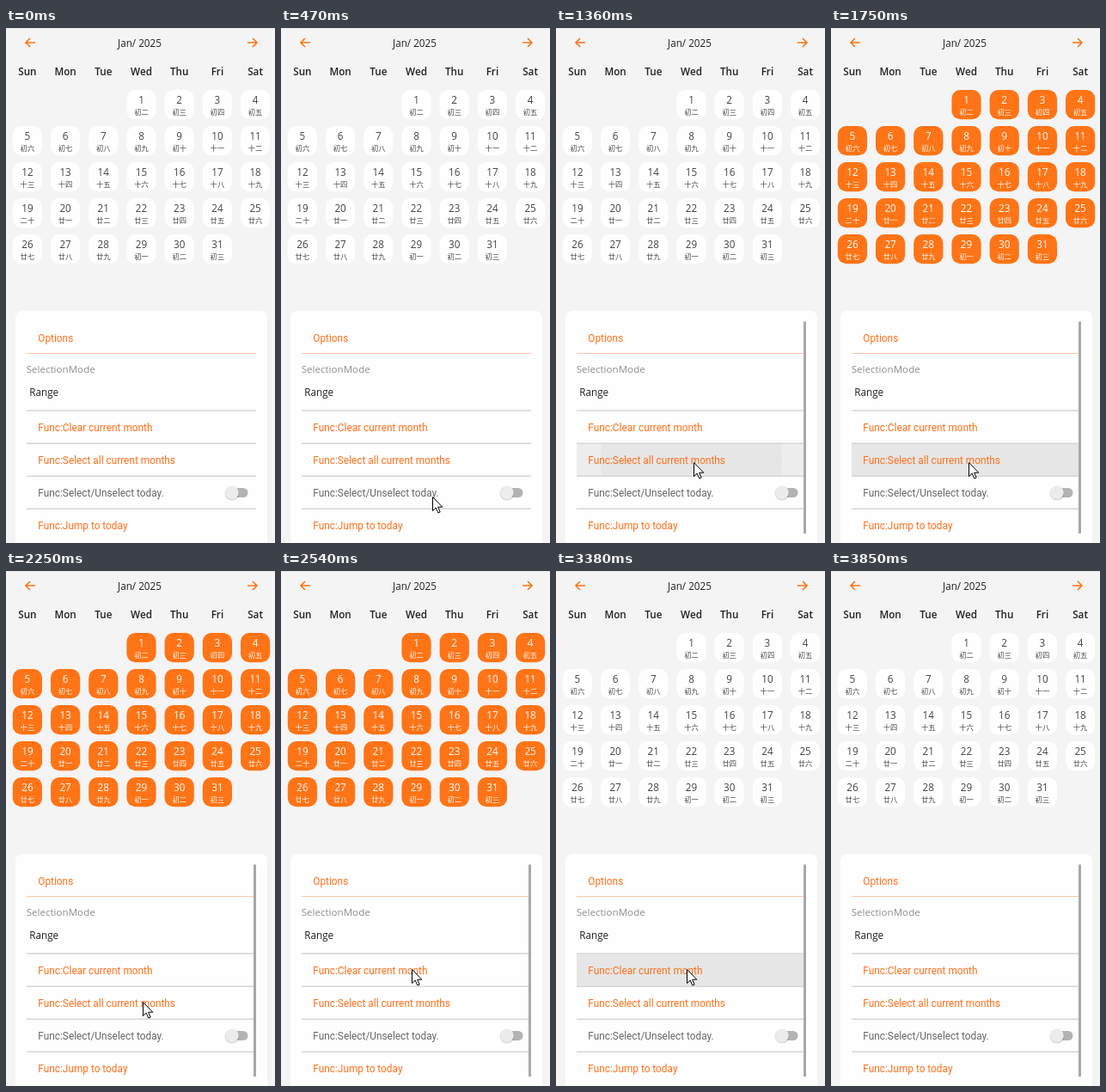
An HTML page for the animation above (4.35 s loop, 313x599 px).

```html
<!DOCTYPE html>
<html lang="en">
<head>
<meta charset="utf-8">
<title>Calendar</title>
<style>
  html, body { margin: 0; width: 100%; height: 100%; overflow: hidden; background: #f4f4f4; }
  svg { display: block; }
  text { font: 11.7px "Open Sans", sans-serif; fill: #222; }
  .mid { text-anchor: middle; }
  .head { font-weight: 600; }
  .func { font: 11.85px Roboto, sans-serif; fill: #ff6f1a; }
  .gray { fill: #666; }
  .label { fill: #8e8e8e; font-size: 11.6px; }
  .cell rect { fill: #fefefe; }
  .cell text { fill: #444; }
  .cell .lunar { font: 8.3px "Noto Sans CJK SC", "Noto Sans CJK JP", sans-serif; }
  .on .cell rect { fill: #ff7416; }
  .on .cell text { fill: #fff; }
  .arrow { fill: none; stroke: #ff7416; stroke-width: 1.6; }
</style>
</head>
<body>
<svg id="stage" width="313" height="599" viewBox="0 0 313 599">
  <rect width="313" height="1" fill="#e6e6e6"/>
  <path class="arrow" d="M34 17H23M28 12l-5 5 5 5M281 17h11M287 12l5 5-5 5"/>
  <text class="mid" x="155.5" y="21.5">Jan/ 2025</text>
  <g id="month"></g>
  <rect x="11" y="329" width="293" height="290" rx="8" fill="#fefefe"/>
  <svg class="row" x="24" y="484" width="267" height="37"><rect width="267" height="37"/><circle cx="133.5" cy="18.5"/></svg>
  <svg class="row" x="24" y="446" width="267" height="37"><rect width="267" height="37"/><circle cx="132" cy="18.5"/></svg>
  <path d="M24 378.5H291" stroke="#fcc5ab"/>
  <path d="M24 445H291M24 483.3H291M24 521.3H291M24 559.3H291" stroke="#d6d6d6" stroke-width="1.4"/>
  <text class="func" x="37.3" y="364.5">Options</text>
  <text class="label" x="23.7" y="400.5">SelectionMode</text>
  <text x="27.3" y="428.3" font-size="11.6">Range</text>
  <text class="func" x="37.3" y="469">Func:Clear current month</text>
  <text class="func" x="37.3" y="507">Func:Select all current months</text>
  <text class="func gray" x="37.3" y="545">Func:Select/Unselect today.</text>
  <text class="func" x="37.3" y="583">Func:Jump to today</text>
  <rect x="259" y="535" width="22.5" height="11" rx="5.5" fill="#b3b3b3"/>
  <circle cx="263" cy="541.2" r="8.4" fill="#000" opacity=".14"/>
  <circle cx="263" cy="540.3" r="7.8" fill="#ececec"/>
  <rect id="bar" x="288" y="341.5" width="3" height="246.5" fill="#a8a8a8"/>
  <path id="cursor" d="M.5 .5V16.6L4.2 13l2.7 6 2.3-1-2.6-5.8H11.8Z" fill="#fff" stroke="#000"/>
</svg>
<script>
const LOOP = 4350;
const $ = q => document.querySelector(q);
const month = $('#month'), bar = $('#bar'), cursor = $('#cursor');
const rows = document.querySelectorAll('.row');
const clamp = v => Math.max(0, Math.min(1, v));

function lunar(day) {
  const n = day < 29 ? day + 1 : day - 28;
  if (n === 20) return '二十';
  const digit = '一二三四五六七八九十'[(n - 1) % 10];
  return (n <= 10 ? '初' : n < 20 ? '十' : '廿') + digit;
}

const colX = i => 24.9 + 44.2 * i;
let html = 'Sun Mon Tue Wed Thu Fri Sat'.split(' ')
  .map((name, i) => `<text class="mid head" x="${colX(i)}" y="55">${name}</text>`).join('');
for (let day = 1; day <= 31; day++) {
  const slot = day + 2, y = 89.2 + 42 * Math.floor(slot / 7);
  html += `<g class="cell mid" transform="translate(${colX(slot % 7)} ${y})">
    <rect x="-17.1" y="-17.1" width="34.2" height="34.2" rx="10"/>
    <text y="-1.2">${day}</text><text class="lunar" y="11.7">${lunar(day)}</text></g>`;
}
month.innerHTML = html;

// Pointer track: time, x, y
const track = [
  [240, 143, 588], [480, 176, 545], [760, 160, 507], [880, 160, 507], [940, 160, 505],
  [2180, 160, 505], [2540, 152, 463], [3680, 152, 463], [3830, 53, 549], [3850, 53, 549]
];

function pointer(t) {
  const i = track.findIndex(p => t < p[0]);
  if (i < 1) return null;
  const [t0, x0, y0] = track[i - 1], [t1, x1, y1] = track[i];
  const p = (t - t0) / (t1 - t0), e = p * p * (3 - 2 * p);
  return [x0 + (x1 - x0) * e, y0 + (y1 - y0) * e];
}

function ripple(row, age, released) {
  const [back, ring] = row.children;
  row.setAttribute('opacity', age < 0 ? 0 : 1 - clamp(released / 400));
  back.setAttribute('opacity', 0.067 * clamp(age / 180));
  ring.setAttribute('opacity', 0.033);
  ring.setAttribute('r', Math.max(0, Math.min(140, age / 2)));
}

function draw(now) {
  const t = now % LOOP, at = pointer(t);
  month.classList.toggle('on', t >= 1750 && t < 3380);
  bar.setAttribute('opacity', t >= 1170 ? 1 : 0);
  ripple(rows[0], t - 1150, t - 1750);
  ripple(rows[1], t - 2720, t - 3380);
  cursor.setAttribute('opacity', at ? 1 : 0);
  if (at) cursor.setAttribute('transform', `translate(${at.map(Math.round)})`);
  requestAnimationFrame(draw);
}
draw(performance.now());
</script>
</body>
</html>
```
